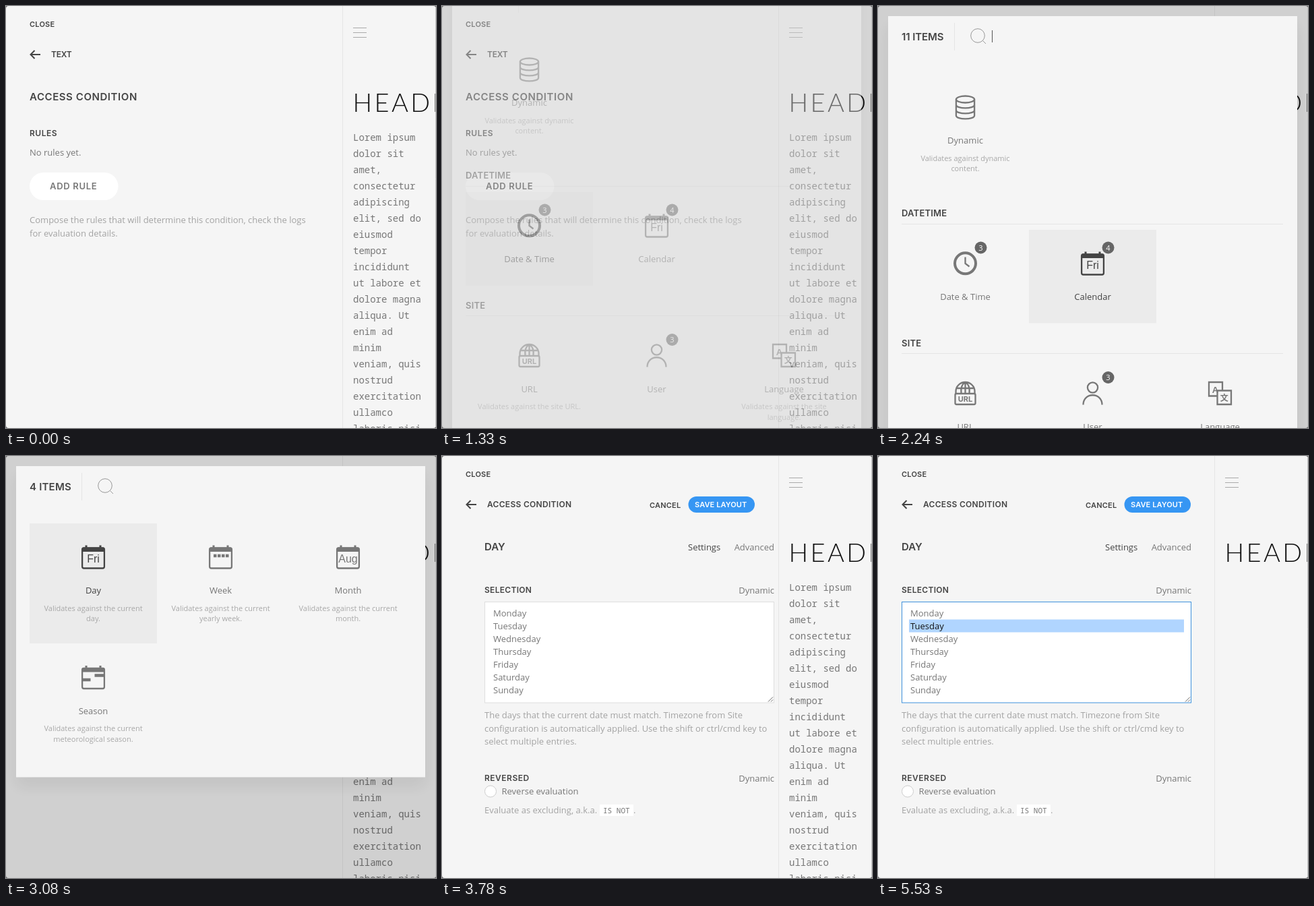
Recreate the animation shown at these times as an HTML page. Size 638 by 626 pixels, loop 6.02 s.

```html
<!DOCTYPE html>
<html lang="en">
<head>
<meta charset="utf-8">
<title>Access condition</title>
<style>
html, body { margin: 0; width: 100%; height: 100%; overflow: hidden; background: #666; }
svg { display: block; }
#stage { width: 638px; height: 626px; border-radius: 4px; background: #f5f5f5; }

text { font: 13px "Open Sans", "Noto Sans", sans-serif; fill: currentColor; white-space: pre; }
#stage { color: #777; }
.cap { font-family: Inter, "Open Sans", sans-serif; font-weight: 600; fill: #444; }
.s11 { font-size: 11px; letter-spacing: .2px; }
.s12 { font-size: 12px; letter-spacing: .3px; }
.s13 { font-size: 13px; letter-spacing: .2px; }
.s15 { font-size: 15px; }
.wide { letter-spacing: .57px; }
.btn { letter-spacing: .7px; fill: currentColor; }
.soft { fill: #a3a3a3; }
.dark { fill: #444; }
.desc { font-size: 11px; fill: #a8a8a8; }
.mid { text-anchor: middle; }
.end { text-anchor: end; }
.mono { font: 300 14px "Noto Sans Mono", "DejaVu Sans Mono", monospace; }
.code { font: 11px "Noto Sans Mono", "DejaVu Sans Mono", monospace; }
.headline { font: 300 38px Lato, sans-serif; letter-spacing: 3.4px; fill: #111; }
.glyph { font: 16px "Liberation Sans", Arial, sans-serif; text-anchor: middle; }
.count { font-size: 11px; fill: #fff; text-anchor: middle; }
.line { stroke: #e5e5e5; }
.ico { fill: none; stroke: currentColor; stroke-width: 2.3; }
.bg { fill: var(--bg, none); }
.shadow { opacity: .07; filter: blur(12.5px); }

/* One loop is 86 ticks of 70 ms */
.a { animation: 6020ms step-end infinite; }
.before { animation-name: before; }
.after { animation-name: after; }
.press { animation-name: press; }
.veil { animation-name: veil; }
.dialog { animation-name: dialog; }
.types { animation-name: types; }
.days { animation-name: days; }
.caret { animation-name: caret; }
.hover-time { animation-name: hover-time; }
.hover-cal { animation-name: hover-cal; }
.hover-day { animation-name: hover-day; }
.track { animation-name: slide; }
.lorem { animation-name: lorem; }
.reload { animation-name: reload; }
.picked { animation-name: picked; }
.pick-text { animation-name: pick-text; }
.field { animation-name: focus; }

@keyframes before { 59.302%, 100% { visibility: hidden } }
@keyframes after { 0% { visibility: hidden } 59.302%, 100% { visibility: visible } }
@keyframes press { 11.627%, 100% { color: #444 } }
@keyframes veil {
  0% { opacity: 0 } 20.93% { opacity: .41 } 22.093% { opacity: .88 } 23.255% { opacity: 1 }
  59.302% { opacity: .56 } 60.465% { opacity: .09 } 61.627%, 100% { opacity: 0 }
}
@keyframes dialog {
  0% { opacity: 0; transform: translateY(-102px) }
  19.767% { opacity: 0; transform: translateY(-102.7px); animation-timing-function: steps(4) }
  24.418% { opacity: .91; transform: translateY(-9.3px) }
  25.581% { opacity: 1; transform: none }
  58.139% { opacity: 1; transform: translateY(0); animation-timing-function: steps(2) }
  60.465%, 100% { opacity: .55; transform: translateY(-45px) }
}
@keyframes types { 41.86%, 100% { visibility: hidden } }
@keyframes days { 0% { visibility: hidden } 41.86%, 100% { visibility: visible } }
@keyframes caret {
  0% { opacity: 1 } 29.069% { opacity: 0 } 37.209% { opacity: 1 }
  41.86% { opacity: 0 } 59.302%, 100% { opacity: 1 }
}
@keyframes hover-time { 20.93% { color: #444; --bg: #ebebeb } 23.255%, 100% { color: #777; --bg: none } }
@keyframes hover-cal { 36.046%, 100% { color: #444; --bg: #ebebeb } }
@keyframes hover-day { 51.162% { color: #444; --bg: #ebebeb } 59.302%, 100% { color: #777; --bg: none } }
@keyframes slide {
  0% { transform: none } 59.302% { transform: translateX(-28px) } 60.465% { transform: translateX(-167px) }
  61.627% { transform: translateX(-333px) } 62.79% { transform: translateX(-472px) }
  63.953%, 100% { transform: translateX(-500px) }
}
@keyframes lorem { 70.93%, 100% { visibility: hidden } }
@keyframes reload {
  0% { opacity: 1 } 70.93% { opacity: 0 } 87.209% { opacity: .5 } 91.86%, 100% { opacity: 1 }
}
@keyframes picked { 0% { visibility: hidden } 81.395%, 100% { visibility: visible } }
@keyframes pick-text { 81.395%, 100% { color: #111 } }
@keyframes focus {
  0% { stroke: #dedede }
  80.232% { stroke: #dedede; animation-timing-function: steps(4) }
  84.883%, 100% { stroke: #3f92dc }
}
</style>
</head>
<body>
<svg id="stage" viewBox="0 0 638 626" xmlns="http://www.w3.org/2000/svg">
  <defs>
    <clipPath id="side"><path d="M0 0H499V626H0z"/></clipPath>
    <g id="cal">
      <rect class="ico" x="-16.4" y="4" width="32.8" height="30" rx="2.5"/>
      <path d="M-17 9.5V5q0-2 2-2h3V0h3v3h18V0h3v3h3q2 0 2 2v4.5z" fill="currentColor"/>
    </g>
    <g id="db" class="ico">
      <ellipse cy="6" rx="13.6" ry="5"/>
      <path d="M-13.6 6V30c0 6.6 27.2 6.6 27.2 0V6M-13.6 14c0 6.6 27.2 6.6 27.2 0M-13.6 22c0 6.6 27.2 6.6 27.2 0"/>
    </g>
    <g id="clock" class="ico">
      <circle cy="17.3" r="15.5" stroke-width="4"/>
      <path d="M0 8V17.5L6 22"/>
    </g>
    <g id="user" class="ico">
      <circle cy="9" r="7.6"/>
      <path d="M-14 34.5C-14 15.5 14 15.5 14 34.5"/>
    </g>
    <g id="url">
      <path class="ico" stroke-width="2" d="M-14 18V14.5a14 13.5 0 0 1 28 0V18M-13 10H13M-6 18C-7 10-5 4 0 1C5 4 7 10 6 18M0 1V18"/>
      <rect class="ico" x="-15" y="18" width="30" height="16" rx="2"/>
      <text class="mid" y="30.2" style="font:700 11px Inter,sans-serif">URL</text>
    </g>
    <g id="lang">
      <path class="ico" stroke-width="2" d="M-4 21.5H-16.5V1H3.5V13M-4 13.5H16.5V34H-4z"/>
      <text class="mid" x="-7" y="16.5" style="font:700 13px 'Liberation Sans',sans-serif">A</text>
      <text class="mid" x="6.3" y="28.5" style="font:700 12px 'Noto Sans CJK SC','Noto Sans CJK JP',sans-serif">文</text>
    </g>
    <g id="lens" fill="none" stroke="#999">
      <circle cx="148" cy="44" r="10.3"/><path d="M155.5 51.5L160 56"/>
    </g>
  </defs>

  <path d="M499.5 0V626" class="line"/>

  <!-- page preview -->
  <g class="a reload">
    <path d="M515 32.5h20M515 39.5h20M515 46.5h20" stroke="#aaa"/>
    <text class="headline" x="514.5" y="156.5">HEADLINE</text>
  </g>
  <g class="a lorem" id="lorem"></g>

  <!-- sidebar header -->
  <text class="cap s11" x="35" y="31">CLOSE</text>
  <path d="M51 72H37M42.5 66L36.5 72L42.5 78" fill="none" stroke="#444" stroke-width="2"/>
  <text class="cap s12 a before" x="67" y="76" style="letter-spacing:-.2px">TEXT</text>
  <g class="a after">
    <text class="cap s12" x="67" y="76">ACCESS CONDITION</text>
    <text class="cap s11" x="308" y="77">CANCEL</text>
    <rect x="365.5" y="60" width="98.5" height="24" rx="12" fill="#3696f3"/>
    <text class="cap s11" x="375" y="76" style="fill:#fff;letter-spacing:.1px">SAVE LAYOUT</text>
  </g>

  <!-- sliding panels -->
  <g clip-path="url(#side)">
    <g class="a track">
      <text class="cap s15 wide" x="35" y="140">ACCESS CONDITION</text>
      <text class="cap s12" x="35" y="193" style="letter-spacing:.5px">RULES</text>
      <g class="a before">
        <text x="35" y="222">No rules yet.</text>
        <rect x="35" y="247" width="131.5" height="41" rx="20.5" fill="#fff"/>
        <g class="a press"><text class="cap s13 btn" x="65" y="272">ADD RULE</text></g>
        <text class="soft" x="35" y="322">Compose the rules that will determine this condition, check the logs</text>
        <text class="soft" x="35" y="341.5">for evaluation details.</text>
      </g>
      <g class="a after">
        <g transform="translate(49 226) scale(.7)" color="#444">
          <use href="#cal"/><text class="glyph" y="25">Fri</text>
        </g>
        <text class="cap s13" x="74" y="234" style="fill:#666">Rule</text>
        <text class="cap s11" x="74" y="251" style="fill:#888">{1} Day</text>
        <path d="M35 267.5H464" class="line"/>
        <rect x="35" y="276" width="80" height="24" rx="12" fill="#fff"/>
        <text class="cap s11 btn" x="45" y="292" style="letter-spacing:.6px">ADD RULE</text>
        <text class="soft" x="35" y="334.5">Compose the rules that will determine this condition, check the logs</text>
        <text class="soft" x="35" y="354">for evaluation details.</text>
      </g>

      <g transform="translate(500 0)">
        <text class="cap s15" x="35" y="140">DAY</text>
        <text class="dark" x="337" y="139.5">Settings</text>
        <text class="end" x="465" y="139.5">Advanced</text>
        <text class="cap s12" x="35" y="203">SELECTION</text>
        <text class="end" x="465" y="203.5">Dynamic</text>
        <rect class="a field" x="35.5" y="216.5" width="429" height="149.5" fill="#fff"/>
        <rect class="a picked" x="46" y="242.5" width="408" height="19" fill="#b0d5ff"/>
        <g id="week"></g>
        <path d="M456 364.5l7-7M460 364.5l3-3" stroke="#666"/>
        <text class="soft" x="35" y="389">The days that the current date must match. Timezone from Site</text>
        <text class="soft" x="35" y="408.5">configuration is automatically applied. Use the shift or ctrl/cmd key to</text>
        <text class="soft" x="35" y="428">select multiple entries.</text>
        <text class="cap s12" x="35" y="482" style="letter-spacing:.5px">REVERSED</text>
        <text class="end" x="465" y="482.5">Dynamic</text>
        <circle cx="44" cy="497.5" r="8.5" fill="#fff" stroke="#ccc"/>
        <text x="60.5" y="502">Reverse evaluation</text>
        <text class="soft" x="35" y="529.5">Evaluate as excluding, a.k.a.</text>
        <rect x="206" y="517" width="50" height="17" fill="#fff"/>
        <text class="code" x="211" y="529.5">IS NOT</text>
        <text class="soft" x="256" y="529.5">.</text>
      </g>
    </g>
  </g>

  <!-- modal -->
  <g class="a veil">
    <path d="M0 0H638V626H0z" opacity=".15"/>
    <g class="a dialog">
      <g class="a types">
        <rect class="shadow" x="15" y="29" width="607" height="900"/>
        <rect x="15" y="15" width="607" height="900" fill="#f5f5f5"/>
        <text class="cap s15" x="35" y="50.5" style="letter-spacing:-.1px">11 ITEMS</text>
        <path d="M113.5 25V66M35 323.5H601M35 515.5H601" class="line"/>
        <use href="#lens"/>
        <path class="a caret" d="M169.5 36V54" stroke="#555"/>
        <text class="cap s13" x="35" y="312">DATETIME</text>
        <text class="cap s13" x="35" y="504.5">SITE</text>
        <g id="types"></g>
      </g>
      <g class="a days">
        <rect class="shadow" x="15" y="29" width="607" height="461.5"/>
        <rect x="15" y="15" width="607" height="461.5" fill="#f5f5f5"/>
        <text class="cap s15" x="35" y="50.5" style="letter-spacing:.2px">4 ITEMS</text>
        <path d="M112.5 25V66" class="line"/>
        <use href="#lens" x="-1"/>
        <path class="a caret" d="M168.5 36V54" stroke="#555"/>
        <g id="days"></g>
      </g>
    </g>
  </g>

  <path d="M637.5 0V626" stroke="#c6c6c6"/>
</svg>

<script>
const fill = (id, html) => { document.getElementById(id).innerHTML = html; };

const lorem = 'Lorem ipsum|dolor sit|amet,|consectetur|adipiscing|elit, sed do|eiusmod|tempor|incididunt|' +
  'ut labore et|dolore magna|aliqua. Ut|enim ad|minim|veniam, quis|nostrud|exercitation|ullamco|laboris nisi';
fill('lorem', lorem.split('|').map((s, i) =>
  `<text class="mono" x="515" y="${200 + 24 * i}">${s}</text>`).join(''));

const week = ['Monday', 'Tuesday', 'Wednesday', 'Thursday', 'Friday', 'Saturday', 'Sunday'];
fill('week', week.map((s, i) =>
  `<text class="${i === 1 ? 'a pick-text' : ''}" x="48" y="${237.5 + 19 * i}">${s}</text>`).join(''));

// Tiles are 189 px wide; col counts from the left edge of the grid.
function tile({ col, y, icon, name, desc = [], glyph = '', count, hover = '', h = 178 }) {
  const badge = count
    ? `<circle cx="23" cy="26.5" r="9" fill="#666"/><text class="count" x="23" y="30.5">${count}</text>` : '';
  const lines = desc.map((s, i) => `<text class="desc mid" y="${129.5 + 15.5 * i}">${s}</text>`).join('');
  return `<g transform="translate(${129.5 + 189 * col} ${y})"><g class="a ${hover}">
    <rect class="bg" x="-94.5" width="189" height="${h}"/>
    <g transform="translate(0 32.5)"><use href="#${icon}"/>${glyph}</g>
    ${badge}<text class="mid" y="104">${name}</text>${lines}</g></g>`;
}
const word = s => `<text class="glyph" y="25.5">${s}</text>`;
const bars = d => `<path d="${d}" stroke="currentColor" stroke-width="4.5"/>`;
const against = 'Validates against ';

fill('types', [
  { col: 0, y: 100, icon: 'db', name: 'Dynamic', desc: [against + 'dynamic', 'content.'] },
  { col: 0, y: 332, icon: 'clock', name: 'Date &amp; Time', count: 3, hover: 'hover-time', h: 138.5 },
  { col: 1, y: 332, icon: 'cal', name: 'Calendar', count: 4, glyph: word('Fri'), hover: 'hover-cal', h: 138.5 },
  { col: 0, y: 524.5, icon: 'url', name: 'URL', desc: [against + 'the site URL.'] },
  { col: 1, y: 524.5, icon: 'user', name: 'User', count: 3 },
  { col: 2, y: 524.5, icon: 'lang', name: 'Language', desc: [against + 'the site', 'language.'] }
].map(tile).join(''));

const current = against + 'the current';
fill('days', [
  { col: 0, y: 100, icon: 'cal', name: 'Day', desc: [current, 'day.'], glyph: word('Fri'), hover: 'hover-day' },
  { col: 1, y: 100, icon: 'cal', name: 'Week', desc: [current, 'yearly week.'],
    glyph: bars('M-10.5 15.5h4.5m1.5 0h4.5m1.5 0h4.5m1.5 0h4.5') },
  { col: 2, y: 100, icon: 'cal', name: 'Month', desc: [current, 'month.'], glyph: word('Aug') },
  { col: 0, y: 278.5, icon: 'cal', name: 'Season', desc: [current, 'meteorological season.'],
    glyph: bars('M2 14.5H17M-17 21H-4') }
].map(tile).join(''));
</script>
</body>
</html>
```
